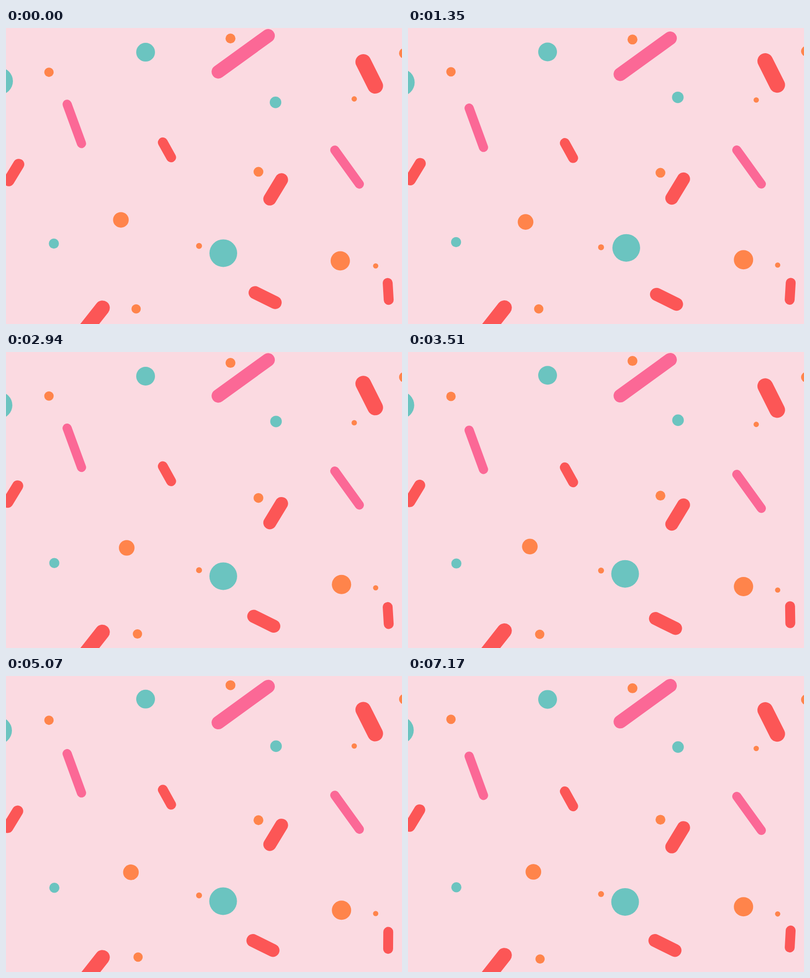
Recreate the animation shown at these times as an HTML page. Size 800x600 px, loop 7.2 s.

```html
<!DOCTYPE html>
<html lang="en">
<head>
<meta charset="utf-8">
<title>Confetti</title>
<style>
  html, body { margin: 0; width: 100%; height: 100%; overflow: hidden; background: #fbdae1; }
  svg { display: block; width: 100vw; height: 100vh; }
  line { stroke-linecap: round; }
</style>
</head>
<body>
<svg id="stage" viewBox="0 0 800 600"></svg>
<script>
const LOOP = 7200, STEP = 30, CYCLE = 9000;
const TEAL = '#6bc4c0', ORANGE = '#ff844b', RED = '#fc5656', PINK = '#fb6896';
const stage = document.getElementById('stage');
const parts = [];

function add(tag, attrs, x, y, motion) {
  const el = document.createElementNS('http://www.w3.org/2000/svg', tag);
  for (const name in attrs) el.setAttribute(name, attrs[name]);
  stage.append(el);
  parts.push({ el, x, y, ...motion });
}

function dot(fill, x, y, r, motion) {
  add('circle', { r, fill }, x, y, motion);
}

// hx, hy: half of the bar's core line
function bar(stroke, x, y, r, hx, hy, motion) {
  add('line', { x1: -hx, y1: -hy, x2: hx, y2: hy, stroke, 'stroke-width': 2 * r }, x, y, motion);
}

// n bobs per cycle, height a, lowest point at time peak
const bob = (n, a, peak, extra) => ({ n, a, peak, ...extra });
// linear slide from an offset back to the resting place
const slide = (dx, dy, end) => ({ path: [[0, dx, dy], [end, 0, 0]] });

dot(TEAL, 282, 47.6, 19, bob(6, 1.6, 75));
dot(TEAL, -15.9, 109.2, 27.5, bob(3, 1.7, 1770, slide(2.4, 0, 6000)));
dot(TEAL, 545.5, 142.2, 11.7, bob(4, 4.2, 10, slide(-1, 4.3, 2370)));
dot(TEAL, 97.7, 426, 10.2, bob(5, 3.3, 1530, slide(-1, 9, 3330)));
dot(TEAL, 438.6, 454.2, 28, bob(4, 4.6, 190, { path: [[0, .4, -1.7], [1200, 2.5, -4.3], [3200, 0, 0]] }));

dot(ORANGE, 86.8, 89.1, 9.5, bob(6, 1.5, 285));
dot(ORANGE, 453.5, 21.2, 10, bob(6, 3.7, 1125));
dot(ORANGE, 804.5, 48.9, 10.5, bob(3, 2.6, 230));
dot(ORANGE, 703.5, 144.4, 5.4, bob(3, 3.1, 850));
dot(ORANGE, 510, 294.6, 9.9, bob(5, 3.4, 800));
dot(ORANGE, 253.3, 399.1, 15.8, bob(5, 2.15, 900, slide(-21.2, -8, 5300)));
dot(ORANGE, 390, 440.1, 6, bob(5, 4.6, 1450));
dot(ORANGE, 677.8, 472, 19.5, bob(6, 4.4, 355, slide(-2.5, -.3, 1300)));
dot(ORANGE, 746.8, 479.2, 5.3, bob(5, 3.3, 1690));
dot(ORANGE, 266.8, 571.5, 9.4, bob(7, 2.1, 690, slide(-3.9, 0, 4300)));

bar(PINK, 479.2, 55.1, 13.6, 50.3, -36.6, bob(3, 3.4, 1770));
bar(PINK, 138, 198, 9.3, 14.5, 39.8, bob(3, 4.3, 1230));
bar(PINK, 689, 279.1, 9.2, 24.8, 34.5, bob(8, 3.4, 105));

bar(RED, 325.2, 247.4, 10, 8.4, 15.2, bob(3, 2.05, 830));
bar(RED, 13.5, 288.5, 11.3, 10, -16.5, bob(3, 1.9, 2060, slide(2.2, 5.2, 2700)));
bar(RED, 733.8, 89.4, 15.8, 12.1, 24.2, bob(5, 4, 1670));
bar(RED, 544.8, 325.7, 13.2, 11.8, -19.5, bob(3, 3.8, 570));
bar(RED, 519.1, 549.2, 13.2, 20.2, 10, bob(4, 3, 1620, slide(4.4, -2.1, 4700)));
bar(RED, 177.2, 590, 15, 17.5, -22.3, bob(3, 2.8, 2200));
bar(RED, 772.1, 534.1, 10, 0, 17.3, bob(3, 1.8, 2200, { tilt: 3.5, tiltPeak: 1380 }));

const wave = (t, n, peak) => Math.cos(2 * Math.PI * n * (t - peak) / CYCLE);

function offset(path, t) {
  if (!path) return [0, 0];
  const i = path.findIndex(key => key[0] > t);
  if (i < 0) return path[path.length - 1].slice(1);
  const [t0, x0, y0] = path[i - 1], [t1, x1, y1] = path[i];
  const k = (t - t0) / (t1 - t0);
  return [x0 + (x1 - x0) * k, y0 + (y1 - y0) * k];
}

function draw(t) {
  for (const p of parts) {
    const [dx, dy] = offset(p.path, t);
    const y = p.y + dy + p.a * wave(t, p.n, p.peak);
    const turn = p.tilt ? p.tilt * wave(t, p.n, p.tiltPeak) : 0;
    p.el.setAttribute('transform', `translate(${p.x + dx} ${y}) rotate(${turn})`);
  }
}

const start = performance.now();
function tick() {
  const t = (performance.now() - start) % LOOP;
  draw(Math.floor(t / STEP) * STEP);
  requestAnimationFrame(tick);
}
tick();
</script>
</body>
</html>
```
